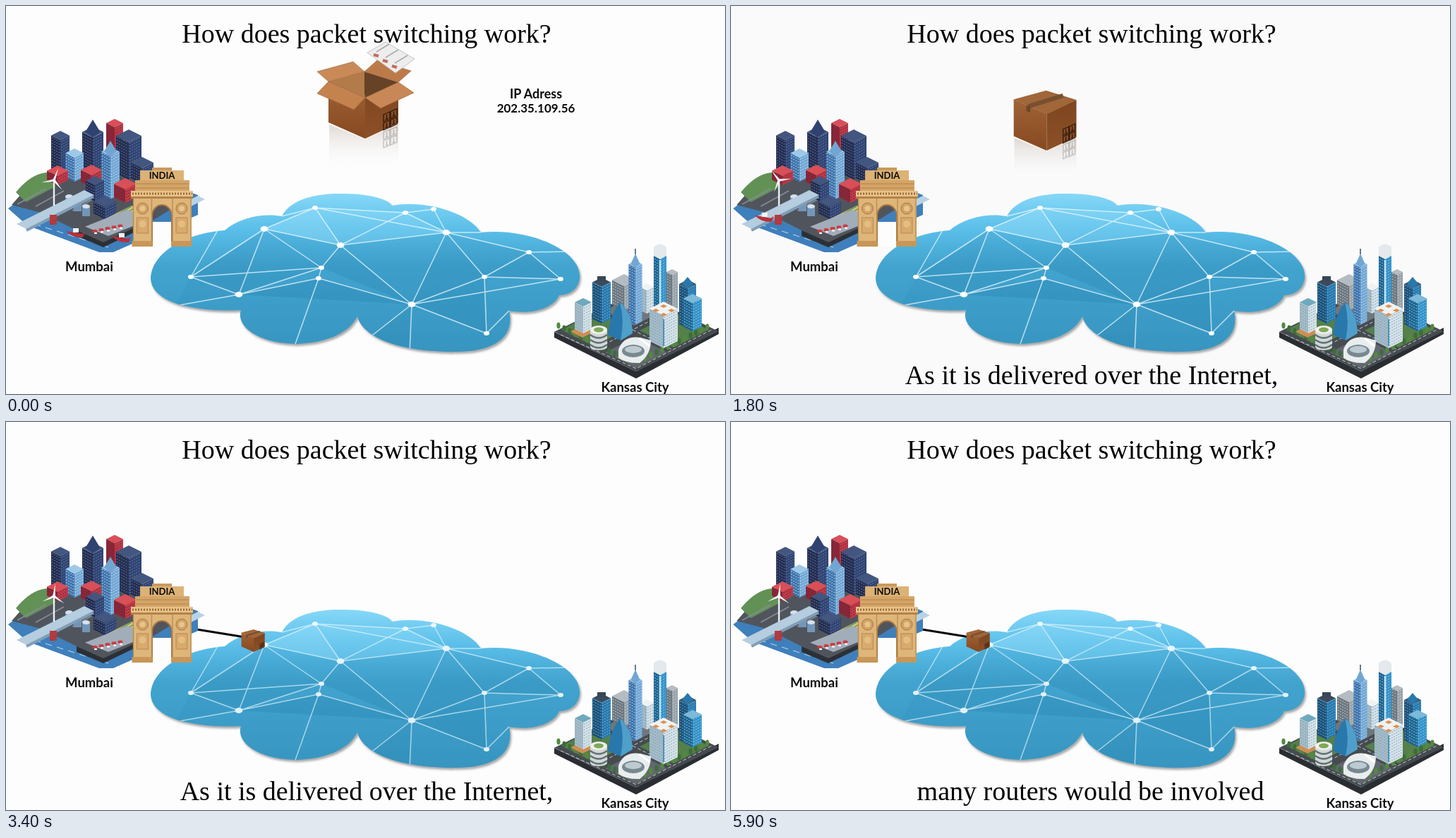
Animation, 1019 px wide and 550 px high, one loop 6 s. Source, as an HTML page:

```html
<!DOCTYPE html>
<html lang="en">
<head>
<meta charset="utf-8">
<title>How does packet switching work?</title>
<style>
html, body { margin: 0; width: 100%; height: 100%; overflow: hidden; background: #fdfdfd; }
svg { display: block; width: 1019px; height: 550px; }
.serif { font: 38px "Liberation Serif", "Times New Roman", serif; text-anchor: middle; }
.label { font: 700 18.5px Lato, "Open Sans", sans-serif; text-anchor: middle; fill: #0b0b0b; }
</style>
</head>
<body>
<svg id="stage" viewBox="0 0 1019 550" xmlns="http://www.w3.org/2000/svg"></svg>
<script>
const LOOP = 6000, STEP = 100;
const $ = id => document.getElementById(id);
const range = (n, f) => Array.from({ length: n }, (_, i) => f(i));
const many = (n, f) => range(n, f).join('');
const mix = (a, b, k) => a.map((v, i) => v + (b[i] - v) * k);
const add = (a, b) => a.map((v, i) => v + b[i]);
const ramp = (t, from, to) => Math.min(1, Math.max(0, (t - from) / (to - from)));

let seed = 7;
const random = () => (seed = seed * 16807 % 2147483647) / 2147483647;

const path = (d, fill, extra = '') => `<path d="${d}" fill="${fill}" ${extra}/>`;
const line = (d, color, width, extra = '') => path(d, 'none', `stroke="${color}" stroke-width="${width}" ${extra}`);
const poly = (points, fill, extra = '') => path(`M${points.map(p => p.join(' ')).join('L')}Z`, fill, extra);
const rect = (x, y, w, h, fill, extra = '') => `<rect x="${x}" y="${y}" width="${w}" height="${h}" fill="${fill}" ${extra}/>`;
const oval = (x, y, rx, ry, fill, extra = '') => `<ellipse cx="${x}" cy="${y}" rx="${rx}" ry="${ry}" fill="${fill}" ${extra}/>`;

// flat isometric tile, front corner at (x, y)
const tile = (x, y, l, r, fill, slope = .5) =>
  path(`M${x} ${y}l${-l} ${-l * slope}l${r} ${-r * slope}l${l} ${l * slope}Z`, fill);

// left wall, right wall, roof, windows
const paint = {
  navy: ['#222b4c', '#2f4270', '#43567f', '#7188b8'],
  red: ['#8f2738', '#c43a48', '#d94f58', '#54263c'],
  sky: ['#3d72aa', '#70a6d4', '#9dc9e9', '#cfe7f7'],
  teal: ['#1b638f', '#3291c8', '#7cb9da', '#a3d6ee'],
  deep: ['#1b4f78', '#2778ad', '#3b4a5e', '#7dbde0'],
  gray: ['#6a757e', '#98a2a9', '#b5bcc1', '#d5dade'],
  pale: ['#a9bbc5', '#dbe3e7', '#f0f2f2', '#5d9fc2']
};

function tower(x, y, top, color, w = 13, spire = 0) {
  const [left, right, roof, win] = paint[color];
  const h = y - top - w;
  const side = (dir, fill) => path(`M${x} ${y}l${dir * w} ${-w / 2}v${-h}L${x} ${y - h}Z`, fill);
  const floors = many(Math.max(0, Math.floor(h / 4)), i =>
    `M${x - w + 1} ${y - 3 - i * 4 - w / 2}l${w - 2} ${w / 2 - 1}l0 .5m2 0l${w - 2} ${-w / 2 + 1}`);
  return side(-1, left) + side(1, right) + tile(x, y - h, w, w, roof)
    + line(floors, win, 1.4, 'stroke-dasharray="2 1.500" opacity=".6"')
    + (spire ? path(`M${x - w * .7} ${top + w / 2}L${x} ${top - spire}L${x + w * .7} ${top + w / 2}L${x} ${top + w}Z`, right) : '');
}

const boat = id => `<g id="${id}">${path('M-13 -3L10 1L14 -2L11 6Q-4 7 -13 -3Z', '#b93038')}${rect(-3, -7, 8, 6, '#f2f4f5')}</g>`;

function harborCity() {
  const blade = i => path('M-1.800 0L0 -18L1.800 0Z', '#f4f8fb', `transform="rotate(${i * 120})"`);
  return path('M3 287L42 258L150 222L272 268V296L152 349H132L30 311Z', '#3f7fbb')
    + line(many(7, i => `M${40 + i * 16} ${309 + i * 5}l9 3`), '#a9d6f3', 1.3)
    + path('M8 282L42 243L150 208L266 268L200 309L138 337L50 293Z', '#50555d')
    + path('M100 318L138 335L200 306V312L138 342L100 326Z', '#2c3035')
    + path('M14 264Q38 234 64 236L70 256L28 278Z', '#629156')
    + line(many(4, i => `M${16 + i * 26} ${281 + i * 3}l40 -22`), '#858d96', 1.6)
    + tower(123, 234, 171, 'navy', 15, 10) + tower(154, 236, 160, 'red', 12)
    + tower(77, 240, 177, 'navy') + tower(174, 246, 175, 'navy', 18) + tower(193, 252, 214, 'navy', 16)
    + tower(97, 249, 202, 'sky') + tower(73, 254, 226, 'red', 15) + tower(121, 257, 225, 'red', 15)
    + tower(148, 274, 200, 'sky', 13, 9) + tower(169, 279, 244, 'red', 16)
    + tower(126, 277, 241, 'navy') + tower(140, 302, 269, 'navy', 16)
    + many(3, i => rect(84 + i * 12, 270 + i * 7, 11, 14, '#7396b8') + oval(89.5 + i * 12, 270 + i * 7, 5.5, 3, '#d3e2ec'))
    + tile(158, 309, 16, 36, '#d9c983')
    + line(many(3, i => `M${148 + i * 5} ${301 + i * 2}l30 -17`), '#6f9c4c', 2)
    + tile(145, 326, 33, 60, '#a2adba', .4)
    + many(5, i => oval(126 + i * 9, 319 - i * 1.8, 3.6, 2.3, '#c93d42') + oval(127 + i * 9, 322 - i * 1.8, 2.2, 1.3, '#fff'))
    + tile(29, 316, 14, 96, '#b5cddf') + line('M29 318L124 270', '#809eb8', 4)
    + tile(246, 292, 10, 36, '#b8d2e6') + rect(62, 296, 10, 14, '#b23a40')
    + line('M68 247V283', '#e9f1f7', 2.4) + `<g id="blades">${many(3, blade)}</g>`
    + boat('boatA') + boat('boatB');
}

function gate() {
  const pillar = x => oval(x, 287, 8, 8, '#d2a266', 'stroke="#a77643"') + oval(x, 287, 4, 4, '#e8c48b')
    + rect(x - 8, 300, 16, 22, '#d7aa6d', 'stroke="#b88850"') + oval(x, 309, 5, 5, '#e4bd83')
    + line(`M${x - 13} 273v60M${x + 13} 273v60`, '#ba8a51', 1.3) + rect(x - 15, 333, 29, 8, '#c79658');
  return rect(207, 306, 28, 35, '#fdfdfd')
    + rect(207, 229, 28, 8, '#c99a5c') + rect(190, 233, 62, 15, '#dcb275')
    + rect(183, 247, 77, 16, '#d4a568') + line('M184 252H259M184 258H259', '#b28049', 1)
    + path('M180 270H263V341H235V298A14 16 0 0 0 207 298V341H180Z', '#dfb67a')
    + line('M207 341V298A14 16 0 0 1 235 298V341', '#a97642', 2)
    + rect(177, 262, 88, 9, '#e7c38a') + rect(177, 270, 88, 3, '#b5834a')
    + line('M179 266H264', '#9c6c39', 3, 'stroke-dasharray="2 2"') + pillar(193.5) + pillar(249)
    + `<text x="221" y="245" class="label" style="font-size:13px">INDIA</text>`;
}

function plainsCity() {
  const tree = (x, y) => oval(x, y, 2.6, 4.4, random() < .6 ? '#3a6e38' : '#55893f');
  return path('M777 462L893 518L1010 456V465L893 528L777 470Z', '#2a2e33')
    + tile(893, 518, 116, 117, '#464b50', .485)
    + tile(833, 482, 46, 50, '#557f4b') + tile(946, 484, 48, 50, '#557f4b')
    + tile(893, 513, 44, 44, '#62686e') + tile(890, 453, 42, 42, '#6f767d')
    + line('M834 487L948 428M838 434L946 488M786 466L893 514L1002 458', '#c9cdd0', 1, 'stroke-dasharray="5 3"')
    + many(13, i => tree(783 + i * 8, 453 + i * 4) + tree(898 + i * 8, 503 - i * 4))
    + tower(876, 432, 380, 'gray', 17) + tower(844, 450, 385, 'deep') + rect(838, 383, 12, 7, '#394656')
    + tower(908, 436, 393, 'pale', 10) + tower(927, 430, 342, 'teal', 9)
    + path('M918 354V342Q927 333 936 342V354L927 359Z', '#e3e9ec') + line('M927 360V426', '#bfe3f5', 2.5)
    + tower(944, 434, 373, 'gray', 8) + tower(892, 452, 361, 'sky', 9.5, 10) + line('M892 352V344', '#415a70', 1.6)
    + tower(966, 457, 388, 'deep', 12, 4) + tower(973, 461, 408, 'teal')
    + tile(817, 470, 17, 16, '#cf8d54') + tower(818, 464, 414, 'pale', 12) + tile(818, 426, 12, 12, '#6fa9bd')
    + path('M853 466Q855 440 870 420Q887 434 888 464L871 474Z', '#2878ab')
    + path('M870 420Q887 434 888 464L871 474Q877 446 870 420Z', '#4f9fca')
    + tower(932, 485, 419, 'pale', 20) + line('M932 444V482', '#4d92bb', 2)
    + many(4, i => tile(932 + 11 * Math.cos(i * Math.PI / 2), 434 + 6 * Math.sin(i * Math.PI / 2), 5, 5, '#dd9150'))
    + rect(828, 460, 24, 23, '#d3d8d6') + oval(840, 483, 12, 5, '#d3d8d6')
    + line(many(3, i => `M828 ${466 + i * 7}q12 9 24 0`), '#5f7077', 2.2)
    + oval(840, 459, 12, 6, '#f0f1ee') + oval(840, 459, 7, 3.4, '#80a957')
    + path('M868 487Q875 467 899 470L914 474Q914 494 898 506Q880 507 868 499Z', '#e9edee')
    + oval(889, 489, 16, 9, '#788891') + oval(889, 487, 12, 5, '#bccbd2') + line('M898 471L912 482', '#fff', 3);
}

const cloudShape = 'M205 385C208 345 262 321 310 318C330 300 365 293 391 298C405 270 450 265 478 266C520 266 545 276 547 283C592 274 655 292 673 321C742 314 816 347 813 385C812 398 803 409 784 410C775 431 740 437 713 432C722 470 690 490 640 490C560 492 505 470 498 440C485 466 450 478 410 479C360 478 325 456 333 431C285 434 205 426 205 385Z';
// capitals are nodes, small letters lie on the rim
const nodes = {
  A: [438, 286], B: [366, 316], C: [474, 339], D: [566, 293], E: [606, 288], F: [624, 321], G: [741, 349], H: [786, 387],
  I: [678, 384], J: [575, 423], K: [681, 464], L: [330, 409], M: [262, 384], N: [447, 371], O: [443, 386],
  p: [391, 298], r: [673, 321], s: [572, 492], t: [410, 479], u: [515, 470], v: [713, 432], w: [300, 318], x: [800, 348], z: [240, 425]
};
const edges = 'AB AC BC BL BN CN CF CJ CD AD AF DF EF DE FG FI FJ GI GH IJ IH IK JK JH JO OL NM NO LM MB LN Ap Fr Js Ot Ju Kv Mw Gx Lz';
const facets = 'ACF ABC ADF BCN BLM BNL CFJ CNJ FIJ FGI GHI IJK JOL LMz Jus';

function cloud() {
  const facet = keys => {
    const points = [...keys].map(k => nodes[k]);
    const bright = points.reduce((sum, p) => sum + p[1], 0) < 960;
    return poly(points, bright ? '#a8e6ff' : '#0f628f', `opacity="${(bright ? .2 : .03) + random() * .15}"`);
  };
  const web = edges.split(' ').map(([a, b]) => `M${nodes[a].join(' ')}L${nodes[b].join(' ')}`).join('');
  const dots = Object.keys(nodes).filter(k => k < 'a').map(k => {
    const size = 'BCFJL'.includes(k) ? 5.4 : 4;
    return oval(...nodes[k], size, size * .72, '#fff');
  }).join('');
  return `<path d="${cloudShape}" fill="url(#sky)" filter="url(#shade)"/><g clip-path="url(#cloudClip)">`
    + facets.split(' ').map(facet).join('')
    + `<g id="web">${line(web, '#e9f8ff', 1.5, 'opacity=".75"')}${dots}</g></g>`;
}

// rim corners of the open carton: left, front, right, back
const L = [457, 107], F = [509, 130], R = [556, 108], B = [508, 93];
const mid = (a, b) => mix(a, b, .5);
// hinge ends, outward lean, closed edge, colour
const flaps = {
  flapLB: [L, B, [-16, -14], mid(L, F), mid(B, R), '#c98a58'],
  flapBR: [B, R, [18, -16], mid(L, B), mid(F, R), '#bd7a49'],
  flapLF: [L, F, [-16, 17], mid(L, B), mid(F, R), '#c4824f'],
  flapFR: [F, R, [22, 15], mid(L, F), mid(B, R), '#c88756']
};
const flap = id => poly([L], flaps[id][5], `id="${id}" stroke="#9c6034" stroke-width=".6"`);

function carton() {
  const marks = (y, skew, color, extra = '') => `<g transform="translate(535 ${y}) skewY(${skew})" ${extra}>`
    + many(4, i => rect(i % 2 * 10, (i >> 1) * 12, 9, 10, 'none', `stroke="${color}" stroke-width="1.200"`)
      + line(`M${i % 2 * 10 + 4.5} ${(i >> 1) * 12 + 2}v6m-2 0h4`, color, 1.2)) + '</g>';
  const drop = [0, 58], center = [508, 125];
  const sheet = poly([[-33, -7], [-7, -22], [34, 2], [7, 22]], '#ededed', 'stroke="#b5b5b5" stroke-width=".8"')
    + many(3, i => line(`M${-20 + i * 13} ${-8 + i * 8}l18 -11`, '#aaa', 1.5) + line(`M${-24 + i * 13} ${-4 + i * 8}l7 2`, '#c46a62', 4));
  return `<g id="box"><g id="mirror">${path('M458 168L509 189L556 167V225H458Z', 'url(#fade)')}${marks(179, -22, '#555', 'opacity=".35"')}</g>`
    + poly([L, B, center, F], '#b27b49') + poly([B, R, F, center], '#664226') + flap('flapLB') + flap('flapBR')
    + `<g id="inside"><g id="sheet">${sheet}</g><g id="address"><text class="label" style="font-size:18px">IP Adress</text>
       <text class="label" y="20" style="font-size:17px">202.35.109.56</text></g></g>`
    + poly([L, F, add(F, drop), add(L, drop)], 'url(#leftSide)') + poly([F, R, add(R, drop), add(F, drop)], 'url(#rightSide)')
    + marks(154, -24, '#24150b') + flap('flapLF') + flap('flapFR')
    + `<g id="lid">${poly([L, F, R, B], '#a1663a')}${line('M480 118L535 101', '#79502f', 7)}${path('M477 116l6 3v9l-6 -3Z', '#6f4525')}</g></g>`;
}

const grad = (id, ...stops) => `<linearGradient id="${id}" x2="0" y2="1">${stops.map(([at, color, alpha = 1]) =>
  `<stop offset="${at}" stop-color="${color}" stop-opacity="${alpha}"/>`).join('')}</linearGradient>`;
const label = (text, x, y) => `<text class="label" x="${x}" y="${y}">${text}</text>`;

$('stage').innerHTML = `<defs>${grad('sky', [0, '#86d8f8'], [.22, '#5bbfe9'], [.45, '#42a4cf'], [1, '#3795c0'])}
  ${grad('leftSide', [0, '#9f6338'], [1, '#87491f'])}${grad('rightSide', [0, '#7d461f'], [1, '#8d5027'])}
  ${grad('fade', [0, '#cfc3ba', .65], [1, '#eee', 0])}
  <clipPath id="cloudClip"><path d="${cloudShape}"/></clipPath>
  <filter id="shade" x="-5%" y="-5%" width="112%" height="115%"><feDropShadow dx="2" dy="3" stdDeviation="1.800" flood-color="#555" flood-opacity=".5"/></filter></defs>`
  + rect(0, 0, 1019, 550, '#fdfdfd', 'id="back"') + cloud() + line('', '#050505', 3, 'id="link"')
  + carton() + harborCity() + gate() + plainsCity()
  + `<text class="serif" x="511" y="52">How does packet switching work?</text><text class="serif" id="caption" y="536"></text>`
  + label('Mumbai', 118, 376) + label('Kansas City', 891.5, 547);

const set = (id, name, value) => $(id).setAttribute(name, value);
const show = (id, on) => set(id, 'visibility', on ? 'visible' : 'hidden');
const place = (id, x, y, turn = 0) => set(id, 'transform', `translate(${x} ${y}) rotate(${turn})`);

function drawFlaps(t) {
  const fold = ramp(t, 1200, 1500);
  const upright = ramp(t, 700, 1200);
  for (const [id, [a, b, lean, shutA, shutB]] of Object.entries(flaps)) {
    const out = id === 'flapBR' ? mix(lean, [0, -23], upright) : lean;
    const p = mix(add(a, out), shutA, fold), q = mix(add(b, out), shutB, fold);
    set(id, 'd', `M${[a, b, q, p].map(c => c.join(' ')).join('L')}Z`);
    show(id, fold < 1);
  }
  show('lid', fold === 1);
  show('inside', fold < .8);
}

function drawBox(t) {
  const pack = ramp(t, 1500, 2400), send = ramp(t, 2700, 3300);
  const [x, y] = mix(mix([509, 188], [222, 308], pack ** 1.4), [351, 326], send);
  const size = 1 - .665 * pack ** 1.7;
  set('box', 'transform', `translate(${x} ${y - 10 * Math.sin(Math.PI * pack)}) scale(${size}) translate(-509 -188)`);
  show('mirror', size > .5);
  set('link', 'd', send && x > 272 ? `M255 291.500L${x} ${y - 19}` : '');
}

function draw(t) {
  const dim = 253 - 3 * (ramp(t, 0, 1800) - ramp(t, 2600, 3300));
  set('back', 'fill', `rgb(${dim},${dim},${dim})`);
  set('web', 'opacity', 1 - .75 * ramp(t, 1900, 2500) + .6 * ramp(t, 2700, 3300));

  const fall = ramp(t, 0, 600), toss = ramp(t, 500, 1200);
  place('sheet', 545 - 39 * fall, 73 + 51 * fall, -30 * fall);
  place('address', 751 - 257 * toss, 131 + 2 * toss - 105 * Math.sin(Math.PI * toss), -36 * toss);
  drawFlaps(t);
  drawBox(t);

  place('boatA', 98 - .0285 * t, 322 - .0123 * t);
  place('boatB', 163 + .0212 * t, 329 - .008 * t);
  show('boatA', t < 3000);
  show('boatB', t < 3000);
  place('blades', 68, 247, 20 + 345 * ramp(t, 0, 3400));

  set('caption', 'x', t < 4100 ? 511 : 509.5);
  $('caption').textContent = t < 700 ? '' : t < 4100 ? 'As it is delivered over the Internet,' : 'many routers would be involved';
}

const start = performance.now();
function tick(now) {
  draw(Math.floor(Math.max(0, now - start) % LOOP / STEP) * STEP);
  requestAnimationFrame(tick);
}
draw(0);
requestAnimationFrame(tick);
</script>
</body>
</html>
```
